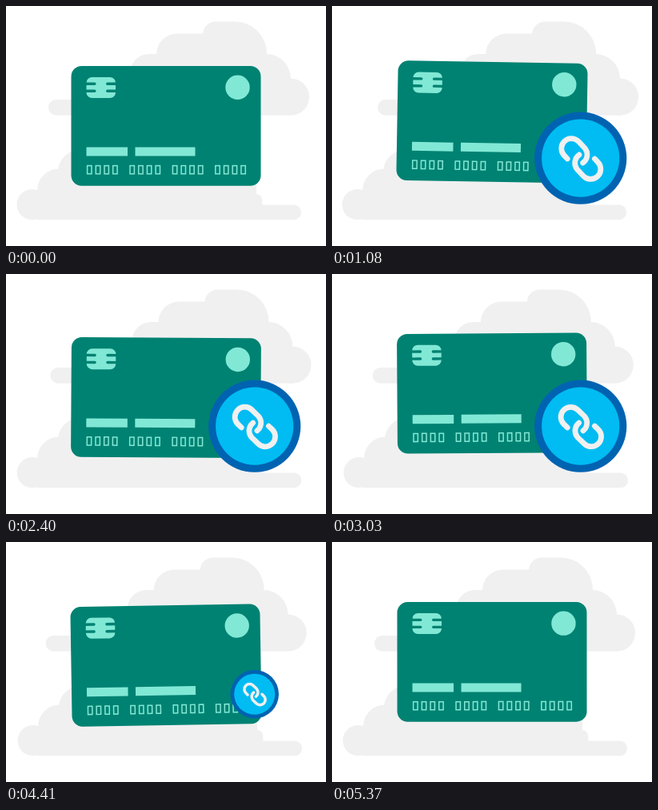
An HTML page with a canvas that plays this animation: 400 px wide and 300 px high, repeating every 5.4 s.

```html
<!DOCTYPE html>
<html lang="en">
<head>
<meta charset="utf-8">
<title>Card link</title>
<style>
  html, body { margin: 0; width: 100%; height: 100%; overflow: hidden; background: #fff; }
  canvas { display: block; width: 400px; height: 300px; }
</style>
</head>
<body>
<canvas id="stage" width="400" height="300"></canvas>
<script>
const canvas = document.getElementById('stage');
const ctx = canvas.getContext('2d');
const ratio = window.devicePixelRatio || 1;
canvas.width = 400 * ratio;
canvas.height = 300 * ratio;

const LOOP = 5400, STEP = 30;
const CLOUD = '#f0f0f0', CARD = '#008272', MINT = '#82e8d6';
const RIM = '#0063b1', BLUE = '#00bcf2';

// Keys are [time, value] pairs joined by sine easing.
const cloudKeys = [[0, 0], [1620, 5.5], [3780, -5], [5400, 0]];
const groundKeys = [[0, 0], [1600, -1.1], [3000, 1], [3750, -0.2], [4500, 1.1], [5400, 0]];
const bobKeys = [[0, 0], [450, 1], [1130, -5], [2250, 5], [3450, -3], [4500, 4.4], [5400, 0]];
const badgeKeys = [[0, 0], [60, 0], [330, 1.31], [540, 0.96], [720, 1.01], [840, 1],
                   [4050, 1], [4230, 1.1], [4580, 0], [5400, 0]];
const swingKeys = [[0, 0], [500, 0], [1100, 2], [2800, -1.5], [3780, 0.7], [4400, 0], [5400, 0]];

function at(keys, t) {
  let i = 1;
  while (i < keys.length - 1 && t > keys[i][0]) i++;
  const [t0, a] = keys[i - 1], [t1, b] = keys[i];
  const p = (t - t0) / (t1 - t0);
  return a + (b - a) * (1 - Math.cos(Math.PI * p)) / 2;
}

// Rounded box given by its edges.
function box(l, t, r, b, radius, color) {
  ctx.fillStyle = color;
  ctx.beginPath();
  ctx.roundRect(l, t, r - l, b - t, radius);
  ctx.fill();
}

function disc(x, y, r, color) {
  ctx.fillStyle = color;
  ctx.beginPath();
  ctx.arc(x, y, r, 0, Math.PI * 2);
  ctx.fill();
}

function layer(x, y, draw) {
  ctx.save();
  ctx.translate(x, y);
  draw();
  ctx.restore();
}

function upperCloud() {
  box(53, 117, 200, 136.7, 9.8, CLOUD);
  box(155, 60, 220, 130, [24, 0, 0, 0], CLOUD);
  box(188, 34.5, 300, 130, [26, 0, 0, 0], CLOUD);
  box(246, 19.5, 326, 110, [16, 40, 0, 0], CLOUD);
  box(200, 60, 356, 136.7, [0, 31, 0, 0], CLOUD);
  disc(355.8, 113.6, 23.2, CLOUD);
}

function lowerCloud() {
  disc(32.6, 248.2, 19.1, CLOUD);
  box(32, 248.5, 369, 267.3, 9.4, CLOUD);
  box(39, 203.5, 110, 260, [27, 0, 0, 0], CLOUD);
  box(65, 180, 313, 260, [27, 0, 0, 0], CLOUD);
  box(300, 235, 320.3, 260, [0, 8, 0, 0], CLOUD);
}

function card() {
  box(81.5, 75, 318.5, 224.7, 13, CARD);

  box(100.5, 89, 137, 115, 7, MINT);
  for (const y of [97.3, 106.3]) {
    box(99.5, y - 1.7, 112.5, y + 1.7, [0, 1.7, 1.7, 0], CARD);
    box(125, y - 1.7, 138, y + 1.7, [1.7, 0, 0, 1.7], CARD);
  }
  disc(289.5, 101.7, 15.2, MINT);

  box(100.5, 176.4, 152, 187.4, 0, MINT);
  box(161.5, 176.4, 236.5, 187.4, 0, MINT);

  ctx.strokeStyle = MINT;
  ctx.lineWidth = 1.5;
  for (let g = 0; g < 4; g++)
    for (let d = 0; d < 4; d++)
      ctx.strokeRect(101.6 + g * 53.4 + d * 10.7, 199.6, 5.4, 10.2);
}

function hook() {
  ctx.beginPath();
  ctx.arc(2.83, 0, 5, Math.PI + 0.14, Math.PI / 2, true);
  ctx.arc(7.07, 0, 5, Math.PI / 2, -Math.PI / 2, true);
  ctx.lineTo(4.65, -5);
  ctx.stroke();
}

function badge(scale, swing) {
  if (scale < 0.005) return;
  ctx.scale(scale, scale);
  disc(0, 0, 57.6, RIM);
  disc(0, 0, 48.6, BLUE);
  ctx.translate(0.6, 0.8);
  ctx.rotate(Math.PI / 4 + swing * Math.PI / 180);
  ctx.scale(2.5, 2.5);
  ctx.strokeStyle = CLOUD;
  ctx.lineWidth = 2.7;
  ctx.lineCap = 'round';
  hook();
  ctx.rotate(Math.PI);
  hook();
}

function render(t) {
  ctx.setTransform(ratio, 0, 0, ratio, 0, 0);
  ctx.fillStyle = '#fff';
  ctx.fillRect(0, 0, 400, 300);

  layer(at(cloudKeys, t), 0, upperCloud);
  layer(at(groundKeys, t), 0, lowerCloud);
  layer(200, 150 + at(bobKeys, t), () => {
    ctx.rotate(Math.sin(t / LOOP * Math.PI * 2) * Math.PI / 180);
    ctx.translate(-200, -150);
    card();
  });
  layer(310.7, 190.2, () => badge(at(badgeKeys, t), at(swingKeys, t)));
}

const start = performance.now();
function tick() {
  const t = (performance.now() - start) % LOOP;
  render(Math.floor(t / STEP) * STEP);
  requestAnimationFrame(tick);
}
tick();
</script>
</body>
</html>
```
